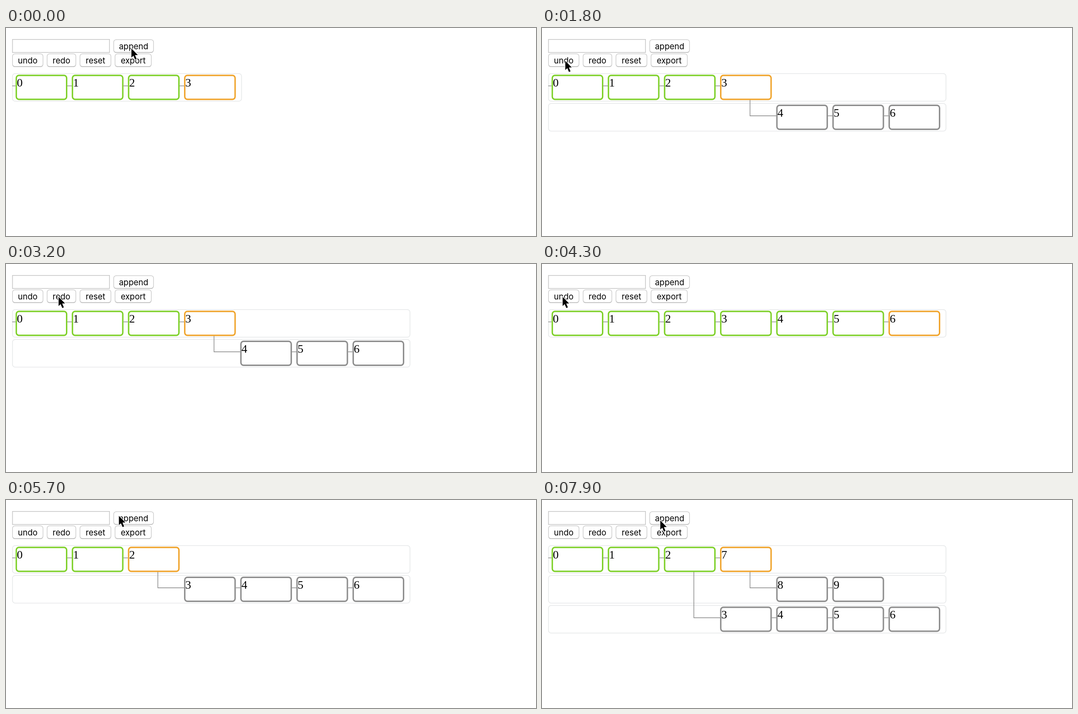
These frames come from a looping animation (1194 by 469 pixels, 8000 ms). An HTML page:

```html
<!DOCTYPE html>
<html lang="en">
<head>
<meta charset="utf-8">
<title>Undo tree</title>
<style>
  html, body { margin: 0; width: 100%; height: 100%; overflow: hidden; background: #fff; }
  svg { display: block; width: 1194px; height: 469px; }
  .button rect { fill: #fff; stroke: #c6c6c6; stroke-width: 1.3; }
  .button .edge { fill: #b4b4b4; stroke: none; }
  .button text { font: 18.5px Inter, "Open Sans", sans-serif; text-anchor: middle; }
  .field { fill: #fff; stroke: #c8c8c8; stroke-width: 1.6; }
  .row { fill: none; stroke: #e6e8e9; stroke-width: 1.6; }
  .link { fill: none; stroke: #858585; stroke-width: 1.4; }
  .node { fill: none; stroke-width: 3.2; }
  .done { stroke: #7ed029; }
  .current { stroke: #f0a42c; }
  .undone { stroke: #8e8e8e; }
  .digit { font: 26px "Liberation Serif", "Times New Roman", serif; }
  .cursor { stroke: #fff; stroke-width: 2.6; stroke-linejoin: round; paint-order: stroke; }
</style>
</head>
<body>
<svg viewBox="0 0 1194 469" xmlns="http://www.w3.org/2000/svg">
  <rect class="field" x="14.6" y="25.8" width="218.6" height="29.4"/>
  <g id="buttons"></g>
  <g id="tree"></g>
  <path id="cursor" class="cursor" d="M.5 1V21.8L5 17.6L8.8 26.2L12.3 24.7L8.6 16H15Z"/>
</svg>
<script>
const LOOP = 8000, TICK = 100;
const PITCH_X = 126.5, PITCH_Y = 67.5;
const el = id => document.getElementById(id);
const range = (a, b) => Array.from({ length: Math.max(0, b - a + 1) }, (_, i) => a + i);

// Bursts of clicks, each moving the current step by one
const bursts = [
  { at: 0, from: 3, to: 3 },
  { at: 200, from: 4, to: 6, gap: 250 },
  { at: 1400, from: 5, to: 0, gap: 160 },
  { at: 2700, from: 1, to: 5, gap: 200 },
  { at: 3900, from: 6, to: 6 },
  { at: 4700, from: 5, to: 2, gap: 100 },
  { at: 5900, from: 7, to: 9, gap: 250 },
  { at: 7200, from: 8, to: 7, gap: 160 }
];

// Pointer trips between buttons; lift bows the path upwards
const home = { x: 282, y: 45 };
const trips = [
  { at: 700, time: 500, x: 52, y: 73 },
  { at: 2100, time: 500, x: 118, y: 73, lift: 3 },
  { at: 3900, time: 400, x: 46, y: 73 },
  { at: 5300, time: 460, x: 264, y: 40, lift: 38 },
  { at: 6700, time: 400, x: 47, y: 77 },
  { at: 7400, time: 500, x: 266, y: 45 }
];

function drawButton(label, x, y, w) {
  return `<g class="button">
    <rect class="edge" x="${x + 0.6}" y="${y + 4}" width="${w - 1.2}" height="26" rx="5.5"/>
    <rect x="${x + 0.6}" y="${y + 0.4}" width="${w - 1.2}" height="28.4" rx="5.5"/>
    <text x="${x + w / 2}" y="${y + 22}">${label}</text></g>`;
}

const column = n => n < 7 ? n : n - 4;   // step 7 branches off step 2
const left = n => 21.6 + PITCH_X * column(n);

function branches(current, last) {
  if (last < 7) return [range(0, current), range(current + 1, last)];
  return [[0, 1, 2, ...range(7, current)], range(current + 1, last), range(3, 6)];
}

function drawNode(n, row, current) {
  const x = left(n), y = PITCH_Y * row;
  const kind = row ? "undone" : n === current ? "current" : "done";
  return `<rect class="node ${kind}" x="${x + 1.6}" y="${y + 106.8}" width="113.4" height="54" rx="6"/>
    <text class="digit" x="${x + 3}" y="${y + 132.4}">${n}</text>`;
}

function drawLink(n, row, first) {
  const x = left(n), y = 130.5 + PITCH_Y * row;
  const begin = row && first ? `${x - 59} 162V${y}` : `${n ? x - 10 : 14} ${y}`;
  return `<path class="link" d="M${begin}H${x}"/>`;
}

function drawTree(current, last) {
  const rows = branches(current, last).filter(r => r.length);
  const width = 10 + PITCH_X * Math.min(last + 1, 7);
  let frames = "", links = "", nodes = "";
  rows.forEach((chain, row) => {
    frames += `<rect class="row" x="14.6" y="${102.8 + PITCH_Y * row}" width="${width}" height="62.2" rx="6"/>`;
    chain.forEach((n, i) => {
      links += drawLink(n, row, i === 0);
      nodes += drawNode(n, row, current);
    });
  });
  return frames + links + nodes;
}

function stateAt(t) {
  let current = 0, last = 0;
  for (const { at, from, to, gap = 1 } of bursts) {
    if (t < at) break;
    const clicks = Math.min(Math.floor((t - at) / gap), Math.abs(to - from));
    current = from + clicks * Math.sign(to - from);
    last = Math.max(last, current);
  }
  return [current, last];
}

function pointerAt(t) {
  let { x, y } = home;
  for (const trip of trips) {
    const p = Math.min(1, Math.max(0, (t - trip.at) / trip.time));
    const e = p * p * (3 - 2 * p);
    x += (trip.x - x) * e;
    y += (trip.y - y) * e - (trip.lift || 0) * 4 * e * (1 - e);
  }
  return [x, y];
}

function render(t) {
  el("tree").innerHTML = drawTree(...stateAt(t));
  el("cursor").setAttribute("transform", `translate(${pointerAt(t)})`);
}

let shown = -1;
const start = performance.now();
function loop() {
  const t = Math.floor((performance.now() - start) % LOOP / TICK) * TICK;
  if (t !== shown) render(shown = t);
  requestAnimationFrame(loop);
}

el("buttons").innerHTML =
  drawButton("append", 242, 26, 91) +
  drawButton("undo", 14, 58, 70) +
  drawButton("redo", 92, 58, 66) +
  drawButton("reset", 166, 58, 71) +
  drawButton("export", 245, 58, 83);
loop();
</script>
</body>
</html>
```
